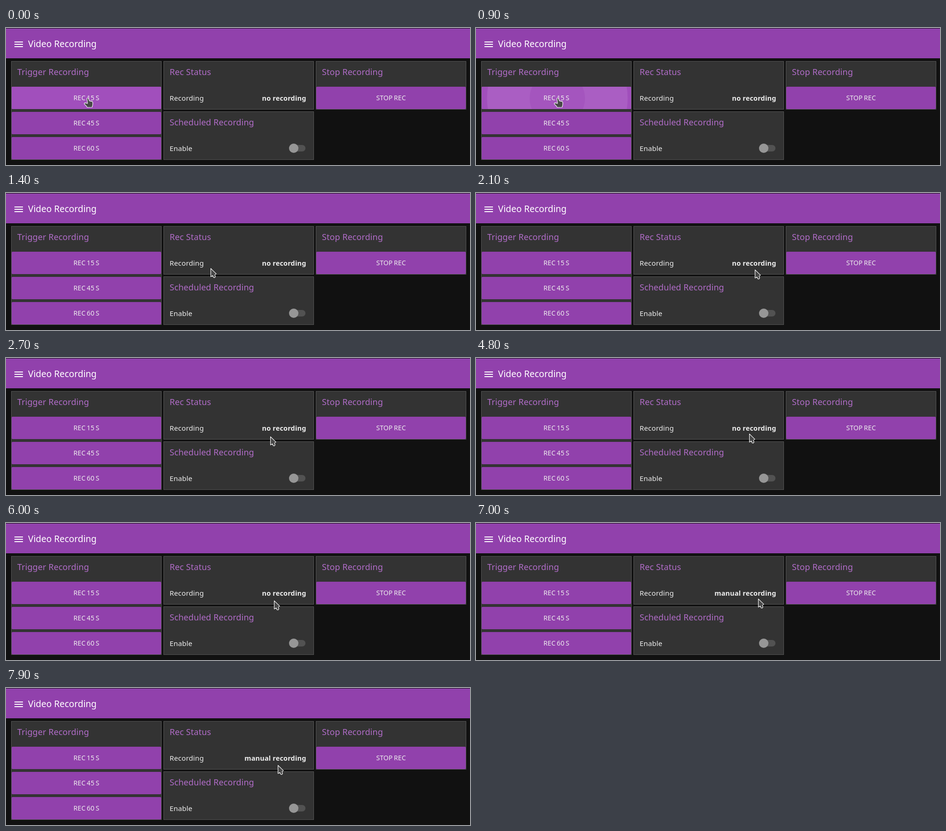
An HTML page for the animation above (8 s loop, 987 px wide and 294 px high).

```html
<!DOCTYPE html>
<html lang="en">
<head>
<meta charset="utf-8">
<title>Video Recording</title>
<style>
  html, body { margin: 0; width: 100%; height: 100%; overflow: hidden; background: #111; }
  svg { display: block; font-family: "Noto Sans", "Open Sans", sans-serif; fill: #eee; }
  .card { fill: #333; stroke: #555; stroke-width: 1; }
  .btn { fill: #9141ac; }
  .heading { font-size: 19px; fill: #fff; }
  .title { font-size: 18px; letter-spacing: .004em; fill: #b06cc7; }
  .label { font-size: 15px; letter-spacing: .01em; }
  .value { font-size: 14.5px; letter-spacing: .01em; font-weight: 700; text-anchor: end; }
  .caption { font-size: 14px; letter-spacing: .005em; word-spacing: -.07em; text-anchor: middle; }
  .pointer { fill: #484848; stroke: #fff; stroke-width: 1.1; stroke-linejoin: round; }
</style>
</head>
<body>
<svg width="987" height="294" viewBox="0 0 987 294">
  <defs>
    <clipPath id="firstButton"><rect x="12" y="126" width="318" height="48" rx="2"/></clipPath>
  </defs>

  <rect width="987" height="294" fill="#111"/>
  <rect y="1" width="987" height="64" fill="#9141ac"/>
  <path d="M18 29h18v2h-18zM18 34h18v2h-18zM18 39h18v2h-18z" fill="#fff"/>
  <text class="heading" x="47" y="41">Video Recording</text>

  <rect class="card" x="11.5" y="71.5" width="319" height="211"/>
  <rect class="card" x="335.5" y="71.5" width="319" height="103"/>
  <rect class="card" x="335.5" y="179.5" width="319" height="103"/>
  <rect class="card" x="659.5" y="71.5" width="319" height="103"/>

  <text class="title" x="24" y="101">Trigger Recording</text>
  <text class="title" x="348" y="101">Rec Status</text>
  <text class="title" x="348" y="209">Scheduled Recording</text>
  <text class="title" x="672" y="101">Stop Recording</text>

  <rect class="btn" x="12" y="126" width="318" height="48" rx="2"/>
  <g clip-path="url(#firstButton)">
    <rect id="hover" x="12" y="126" width="318" height="48" fill="#a14fbc"/>
    <circle id="outer" cx="173" cy="151" fill="#aa5ec3"/>
    <circle id="inner" cx="173" cy="151" fill="#a455be"/>
  </g>
  <rect class="btn" x="12" y="180" width="318" height="48" rx="2"/>
  <rect class="btn" x="12" y="234" width="318" height="48" rx="2"/>
  <rect class="btn" x="660" y="126" width="318" height="48" rx="2"/>
  <text class="caption" x="171" y="155">REC 15 S</text>
  <text class="caption" x="171" y="209">REC 45 S</text>
  <text class="caption" x="171" y="263">REC 60 S</text>
  <text class="caption" x="819" y="155">STOP REC</text>

  <text class="label" x="348" y="156">Recording</text>
  <text class="value" id="status" x="638.5" y="156">no recording</text>
  <text class="label" x="348" y="264">Enable</text>
  <rect x="603" y="251" width="34" height="14" rx="7" fill="#525252"/>
  <circle cx="612" cy="258" r="10" fill="#969696"/>

  <g id="cursor" class="pointer">
    <path id="arrow" d="M.6 .8V18.6L4.6 16.2L6.4 20.2L8.8 20.6L10.4 18.4L9.2 14.4L12.2 12.4Z"/>
    <path id="hand" d="M-.8 2Q0 .2 2 1.4L4.4 7.4L9.8 8.6Q11.8 9.2 11.7 11.4L11.4 16.4L10 21L-.2 21.2L-2.6 17.8L-6.2 14.4Q-7.2 11.8 -4.6 11.6L.4 13Z"/>
  </g>
</svg>
<script>
  const LOOP = 8000, TICK = 100;
  const $ = id => document.getElementById(id);

  // Sideways pointer moves: start, duration, distance
  const swings = [
    [1900, 400, 29], [2300, 400, -45], [2800, 600, 45],
    [3600, 600, -46], [4400, 800, 39], [5500, 700, -38],
    [6300, 900, 43], [7200, 400, -55], [7600, 300, 28]
  ];

  const ramp = (t, from, to) => Math.min(1, Math.max(0, (t - from) / (to - from)));
  const easeOut = (k, power) => 1 - (1 - k) ** power;
  const smooth = k => k * k * (3 - 2 * k);

  function pointerAt(t) {
    const trip = easeOut(ramp(t, 1000, 1800), 1.5);
    let x = 173 + 405 * trip;
    let y = 149 + 19 * trip - 3 * ramp(t, 1800, LOOP);
    for (const [start, duration, distance] of swings) {
      const k = ramp(t, start, start + duration);
      x += distance * smooth(k);
      y -= Math.max(distance, 0) * .12 * Math.sin(Math.PI * k);
    }
    return [Math.round(x), Math.round(y)];
  }

  // Ripples grow while the button is held, then fade.
  function ripple(id, start, t) {
    const growth = ramp(Math.min(t, 900), start, start + 650);
    $(id).setAttribute("r", 158 * easeOut(growth, 2));
    $(id).setAttribute("opacity", 1 - ramp(t, 1000, 1300));
  }

  function render(time) {
    const t = Math.floor(time % LOOP / TICK) * TICK;
    const [x, y] = pointerAt(t);
    const overButton = x < 330;
    $("cursor").setAttribute("transform", `translate(${x} ${y})`);
    $("hand").style.display = overButton ? "" : "none";
    $("arrow").style.display = overButton ? "none" : "";
    $("hover").setAttribute("opacity", 1 - ramp(t, 1200, 1400));
    ripple("outer", 400, t);
    ripple("inner", 765, t);
    $("status").textContent = t < 6800 ? "no recording" : "manual recording";
  }

  const start = performance.now();
  function loop() {
    render(performance.now() - start);
    requestAnimationFrame(loop);
  }
  loop();
</script>
</body>
</html>
```
